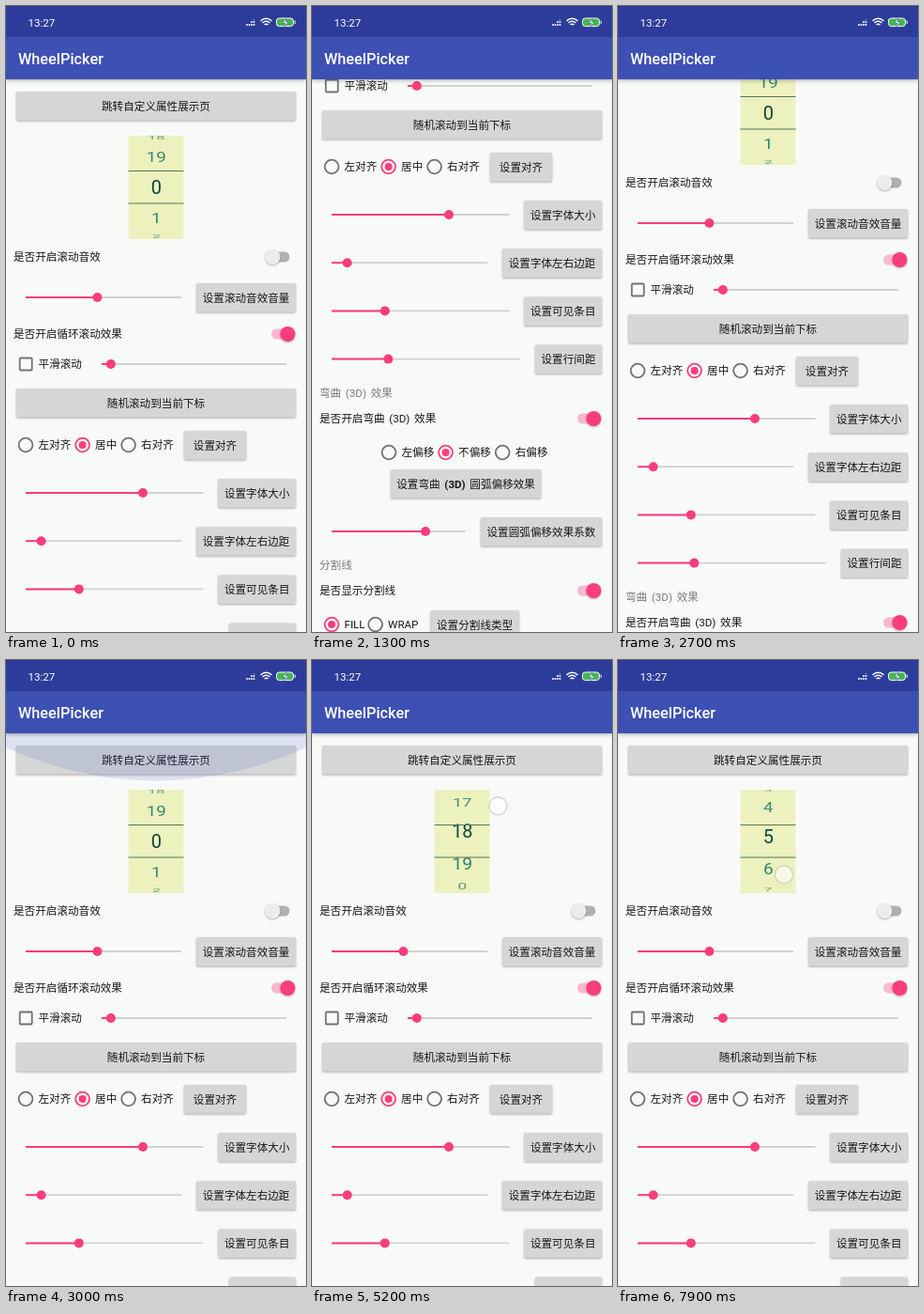
Recreate the animation shown at these times as an HTML page. Size 320 px wide and 666 px high, loop 8 s.

```html
<!DOCTYPE html>
<html lang="zh">
<head>
<meta charset="utf-8">
<title>WheelPicker</title>
<style>
html, body { margin: 0; width: 320px; height: 666px; overflow: hidden; background: #f8faf8; }
svg { display: block; }
text { font: 11.6px Roboto, "Noto Sans CJK SC", "Noto Sans CJK", sans-serif; fill: #161616; word-spacing: 1.8px; }
.gray { fill: #7b7d7c; }
.mid { text-anchor: middle; }
.strong { font-weight: 500; }
.btn { fill: #d5d7d6; filter: drop-shadow(0 1px 1px rgba(0,0,0,.32)); }
.track { stroke: #d0d2d1; stroke-width: 1.8; }
.fill { stroke: #f93d7d; stroke-width: 2; }
.pink { fill: #f93d7d; }
.ring { fill: none; stroke: #707271; stroke-width: 1.8; }
.ring.on { stroke: #f93d7d; }
.bar { filter: drop-shadow(0 1px 2px rgba(0,0,0,.35)); }
.knob { filter: drop-shadow(0 1px 1px rgba(0,0,0,.3)); }
.wheel text { font-size: 20px; text-anchor: middle; fill: #22826d; }
.wheel .picked text { fill: #0b463c; }
.glow { fill: #4257c0; fill-opacity: .145; }
.touch { fill: #fff; fill-opacity: .6; stroke: #77789a; stroke-opacity: .28; stroke-width: 1.4; }
.white { fill: #fff; }
</style>
</head>
<body>
<svg width="320" height="666" viewBox="0 0 320 666">
  <defs>
    <clipPath id="above"><path d="M130 138h59v37h-59zM130 210.500h59v37.500h-59z"/></clipPath>
    <clipPath id="band"><path d="M130 175h59v35.500h-59z"/></clipPath>
  </defs>
  <g id="page">
    <g id="form"></g>
    <g class="wheel">
      <path d="M130.500 138h59v110h-59z" fill="#edf1be"/>
      <g clip-path="url(#above)"><g class="digits"></g></g>
      <g clip-path="url(#band)"><g class="digits picked"></g></g>
      <path d="M130.500 175.500h59M130.500 210h59" stroke="#55775a"/>
    </g>
  </g>
  <path id="topGlow" class="glow" transform="translate(0 78)"/>
  <path id="endGlow" class="glow" transform="translate(0 666) scale(1 -1)"/>
  <path class="bar" d="M0 0h320v78H0z" fill="#3d50b3"/>
  <path d="M0 0h320v33H0z" fill="#2d3c9a"/>
  <text class="white" x="23.500" y="21.500">13:27</text>
  <text class="white strong" x="13" y="62" style="font-size:16.300px">WheelPicker</text>
  <g stroke="#fff" fill="none">
    <path d="M257 21v-3M259.500 21v-3M262 21v-5M264.500 21v-6.500" stroke-width="1.500" stroke-dasharray="2 1"/>
    <path d="M271.500 15.800q6-5 12 0M273.500 18q4-3.400 8 0M275.600 20q2-1.600 4 0" stroke-width="1.500"/>
    <rect x="288.500" y="13" width="18" height="8.600" rx="3" fill="#46b653"/>
    <path d="M308.200 15.500v3.500"/>
    <path d="M299 13l-4 5h3l-1 4 4-5h-3z" fill="#fff" stroke="#2d3c9a" stroke-width=".4"/>
  </g>
  <circle id="touch" class="touch" r="9.500"/>
</svg>
<script>
const $ = id => document.getElementById(id);
const RIGHT = 309;

// Latin letters take about .45 of a Chinese character.
const width = s => [...s].reduce((w, c) => w + (c > '\u2e80' ? 11.6 : 5.2), 0);
const buttonWidth = s => Math.max(66, width(s) + 13);

const label = (x, y, s, cls = '') =>
  `<text class="${cls}" x="${x}" y="${y + 4.3}">${s.replace(/\(3D\)/, cls === 'mid' ? '<tspan font-weight="700">(3D)</tspan>' : '$&')}</text>`;
const button = (y, s, left = RIGHT - buttonWidth(s), w = buttonWidth(s)) =>
  `<rect class="btn" x="${left}" y="${y - 15.5}" width="${w}" height="30.500" rx="1.500"/>` +
  label(left + w / 2, y, s, 'mid');
const wideButton = (y, s) => button(y, s, 11, 298);

function seek(y, part, x, end) {
  const at = x + (end - x) * part;
  return `<path class="track" d="M${x} ${y}H${end}"/><path class="fill" d="M${x} ${y}H${at}"/>
    <circle class="pink" cx="${at}" cy="${y}" r="5"/>`;
}
const seekRow = (y, part, s) => seek(y, part, 21, RIGHT - buttonWidth(s) - 16) + button(y + .5, s);

const switchRow = (y, s, on) => label(8, y, s) +
  `<rect x="${on ? 283 : 280}" y="${y - 5.5}" width="22.500" height="11" rx="5.500" fill="${on ? '#fbb7cf' : '#afb1b0'}"/>
   <circle class="knob" cx="${on ? 300.5 : 284.5}" cy="${y}" r="8" fill="${on ? '#f93d7d' : '#ececec'}"/>`;

function radios(x, y, names, picked) {
  return names.map((s, i) => {
    const on = i === picked, cx = x;
    x += width(s) + 25.8;
    return `<circle class="ring ${on ? 'on' : ''}" cx="${cx}" cy="${y}" r="7.400"/>` +
      (on ? `<circle class="pink" cx="${cx}" cy="${y}" r="4"/>` : '') + label(cx + 13.5, y, s);
  }).join('');
}

$('form').innerHTML = [
  wideButton(106.5, '跳转自定义属性展示页'),
  switchRow(267, '是否开启滚动音效', false),
  seekRow(310, .46, '设置滚动音效音量'),
  switchRow(349, '是否开启循环滚动效果', true),
  '<rect class="ring" x="14.700" y="374.500" width="13" height="13" rx="1"/>',
  label(34.5, 381, '平滑滚动'), seek(381, .05, 102, 299),
  wideButton(422.5, '随机滚动到当前下标'),
  radios(21, 467, ['左对齐', '居中', '右对齐'], 1), button(467.5, '设置对齐', 190),
  seekRow(518, .66, '设置字体大小'),
  seekRow(569.2, .1, '设置字体左右边距'),
  seekRow(620.4, .3, '设置可见条目'),
  seekRow(671.6, .3, '设置行间距'),
  label(8, 708, '弯曲 (3D) 效果', 'gray'),
  switchRow(735, '是否开启弯曲 (3D) 效果', true),
  radios(82, 771, ['左偏移', '不偏移', '右偏移'], 1),
  button(804.5, '设置弯曲 (3D) 圆弧偏移效果', 84),
  seekRow(855, .7, '设置圆弧偏移效果系数'),
  label(8, 891, '分割线', 'gray'),
  switchRow(918, '是否显示分割线', true),
  radios(21, 954, ['FILL', 'WRAP'], 0), button(954.5, '设置分割线类型', 126.5),
  seekRow(1005, .1, '设置分割线高度'),
  seekRow(1043.5, .05, '设置分割线内间距')
].join('');

const clamp = p => Math.min(1, Math.max(0, p));
const linear = p => p;
const smooth = p => p * p * (3 - 2 * p);
const fling = p => 1 - (1 - p) ** 3;
const ramp = (t, from, to, ease = linear) => ease(clamp((t - from) / (to - from)));

const scrollAt = t => 304 * ramp(t, 100, 1800, fling)
  + 134 * ramp(t, 1900, 2120, smooth)
  - 438 * ramp(t, 2220, 2880, smooth);

const wheelAt = t => 20 - 2 * ramp(t, 3750, 4950, smooth)
  + .33 * ramp(t, 5080, 5200)
  - 6.47 * ramp(t, 5200, 6850, fling)
  - 5.4 * ramp(t, 6850, 7700, fling)
  - 2.2 * ramp(t, 7750, 8000);

const strokes = [
  { x: 39, from: 100, to: 400, y: 560, dy: -150 },
  { x: 39, from: 1900, to: 2200, y: 540, dy: -136 },
  { x: 39, from: 2200, to: 2450, y: 404, dy: 196 },
  { x: 185, from: 3750, to: 4750, y: 228, dy: 57 },
  { x: 198.5, from: 5080, to: 5200, y: 166, dy: -11 },
  { x: 198.5, from: 5200, to: 5500, y: 155, dy: 83 },
  { x: 177, from: 6850, to: 7100, y: 158, dy: 74 },
  { x: 177, from: 7750, to: 8000, y: 180, dy: 80 }
];

// The glow swells quickly, then sinks back.
function glow(t, from, span, peak) {
  const p = clamp((t - from) / span);
  const h = peak * (p < .15 ? p / .15 : 1 - ((p - .15) / .85) ** 2);
  return h > 0 ? `M0 0V${h * .3}Q160 ${h * 1.7} 320 ${h * .3}V0Z` : '';
}

// Items sit on a cylinder of radius 55, .64 rad apart.
function digits(v) {
  let out = '';
  for (let n = Math.round(v) - 2; n <= Math.round(v) + 2; n++) {
    const a = (n - v) * .64, cos = Math.cos(a);
    if (cos < .15) continue;
    const k = 180 / (180 + 55 * (1 - cos));
    out += `<text transform="translate(160.300 ${193 + 55 * Math.sin(a)}) scale(${k} ${k * cos})" y="7.100" opacity="${.6 + .4 * cos}">${(n + 20) % 20}</text>`;
  }
  return out;
}

const wheels = document.querySelectorAll('.digits');
const start = performance.now();

function draw(now) {
  const t = Math.max(0, now - start) % 8000;
  $('page').setAttribute('transform', `translate(0 ${-Math.round(scrollAt(t))})`);
  const html = digits(wheelAt(t));
  wheels.forEach(g => g.innerHTML = html);
  $('topGlow').setAttribute('d', glow(t, 2870, 450, 52));
  $('endGlow').setAttribute('d', glow(t, 2070, 600, 31));
  const s = strokes.find(s => t >= s.from && t < s.to);
  $('touch').setAttribute('visibility', s ? 'visible' : 'hidden');
  if (s) $('touch').setAttribute('transform', `translate(${s.x} ${s.y + s.dy * ramp(t, s.from, s.to)})`);
  requestAnimationFrame(draw);
}
draw(start);
</script>
</body>
</html>
```
